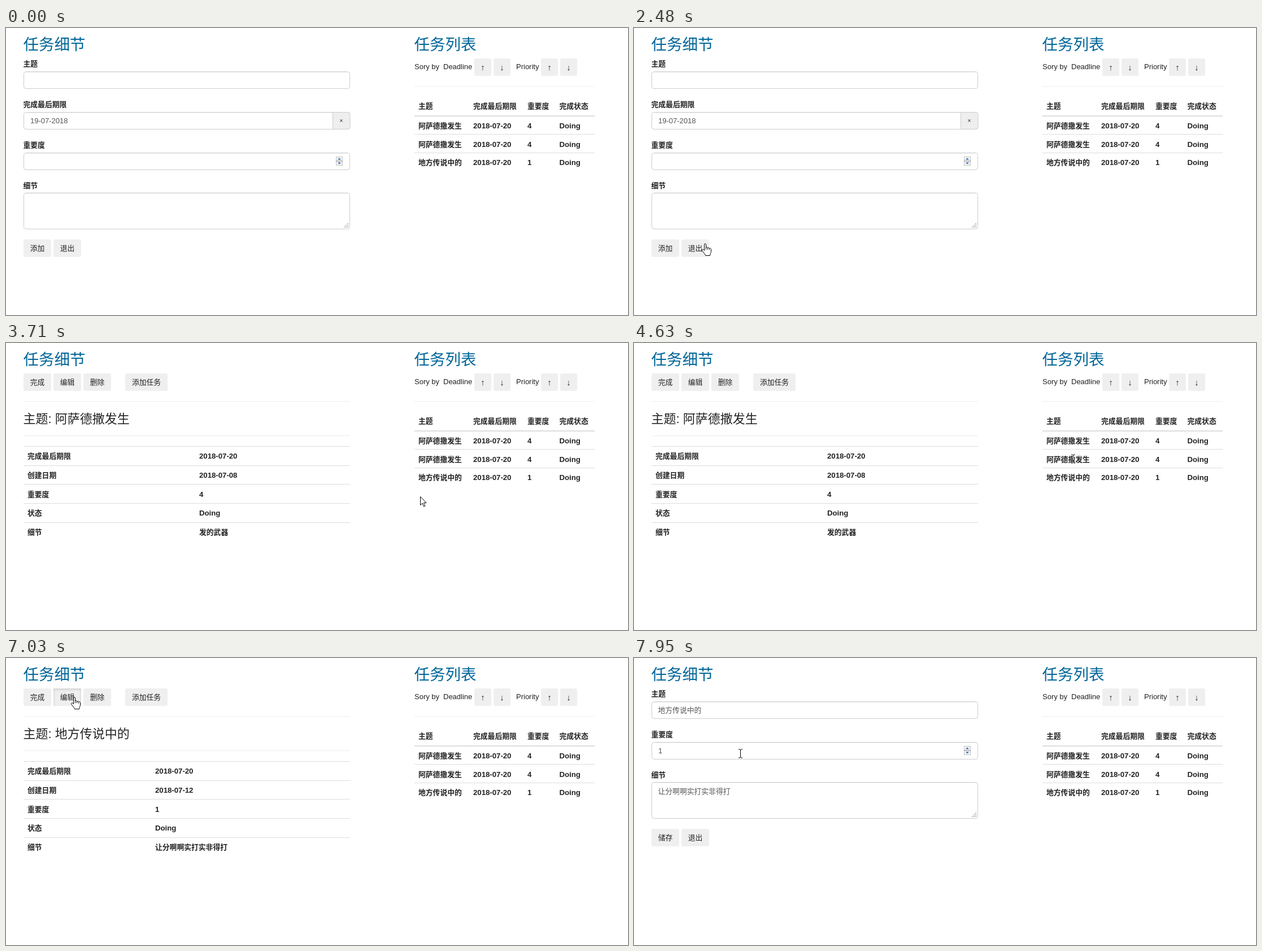
Animation, 1101 px wide and 509 px high, one loop 8000 ms. Source, as an HTML page:

```html
<!DOCTYPE html>
<html lang="zh-CN">
<head>
<meta charset="utf-8">
<title>任务</title>
<style>
  html, body { margin: 0; width: 100%; height: 100%; overflow: hidden; background: #fff; }
  svg { display: block; }
  #stage { width: 100vw; height: 100vh; }
  text { font: 12.8px "Liberation Sans", "Noto Sans CJK SC", "Noto Sans CJK", sans-serif; fill: #222; white-space: pre; }
  .title { font-size: 27.5px; fill: #006699; }
  .topic { font-size: 22px; }
  .latin { font-size: 13px; }
  .bold { font-weight: 700; }
  .value { font-weight: 700; font-size: 13.2px; }
  .field { fill: #555; }
  .sort { font-size: 15px; }
  .close { font-size: 11px; fill: #333; }
  .mid { text-anchor: middle; }
  .box { fill: #fff; stroke: #ccc; }
  .btn { fill: #efefef; }
  .beam { mix-blend-mode: difference; fill: none; stroke: #fff; }
  .solid { fill: #fff; stroke: #000; stroke-linejoin: round; }
</style>
</head>
<body>
<svg id="stage" viewBox="0 0 1101 509">
  <defs><filter id="soft" x="-20%" y="-40%" width="140%" height="180%"><feGaussianBlur stdDeviation="2"/></filter></defs>
  <g id="list"></g>
  <g id="form"></g>
  <g id="first"></g>
  <g id="third"></g>
  <g id="edit"></g>
  <g id="cursor">
    <path id="arrow" class="solid" d="M.5.5V15.6L4 12.2 6.6 18 8.9 17 6.4 11.4H11Z"/>
    <path id="hand" class="solid" transform="translate(-6 0)" d="M4.5 2C4.5 .1 7.5 .1 7.5 2V7C8.5 6.2 10.3 6.6 10.5 7.8 11.5 7.2 13.2 7.6 13.4 8.8 14.8 8.2 16.5 8.8 16.5 10.5V14.5C16.5 16.5 14.6 18 14.6 21.5H6.5C6.3 18.5 1.5 15.5 .6 12.5 .2 10.8 2.2 10 3.2 11.2L4.5 12.6ZM4.5 12.6V2M7.5 7V11M10.5 8V11M13.4 9V11.5"/>
  </g>
  <path id="beam" class="beam" d="M-3.5-7.5H-1L0-6.5 1-7.5H3.5M0-6.5V6.5M-3.5 7.5H-1L0 6.5 1 7.5H3.5"/>
</svg>
<script>
const $ = id => document.getElementById(id);

// Text is placed by the vertical centre of its line.
const SIZE = { title: 27.5, topic: 22 };
const text = (x, mid, str, cls = '') =>
  `<text x="${x}" y="${mid + (SIZE[cls] || 12.6) * 0.38}" class="${cls}">${str}</text>`;
const rule = (x1, x2, y, color = '#ddd', h = 1) =>
  `<rect x="${x1}" y="${y}" width="${x2 - x1}" height="${h}" fill="${color}"/>`;

function button(x, y, label, w = 49, pressedId) {
  const shade = pressedId
    ? `<svg id="${pressedId}" x="${x}" y="${y}" width="${w}" height="31">
        <rect x="-2" y="-.5" width="${w + 4}" height="36" rx="3" fill="none" stroke="#000" stroke-opacity=".18" stroke-width="4" filter="url(#soft)"/></svg>`
    : '';
  return `<rect class="btn" x="${x}" y="${y}" width="${w}" height="31" rx="3"/>` + shade +
    text(x + w / 2, y + 15.5, label, 'mid');
}

const box = (y, h) =>
  `<rect class="box" x="31.5" y="${y + .5}" width="577" height="${h}" rx="4"/>` + rule(34, 606, y + 1, '#f1f1f1');

const spinner = mid =>
  `<rect x="584.5" y="${mid - 7.5}" width="11" height="15" fill="#f3f3f3" stroke="#c4c4c4"/>` +
  rule(584, 596, mid - .5, '#888') +
  `<path fill="#3763bd" d="M587 ${mid - 2.5}h6l-3-3zM587 ${mid + 2.5}h6l-3 3z"/>`;

function area(y) {
  let dots = '';
  for (let row = 0; row < 3; row++)
    for (let col = 0; col <= row; col++)
      dots += `<rect x="${604 - col * 3}" y="${y + 54 + row * 3}" width="2" height="2" fill="#bbb"/>`;
  return box(y, 64) + dots;
}

const labels = names => names.map((n, i) => text(30.5, 63 + i * 72, n, 'bold')).join('');

function listView() {
  const cols = [730, 827, 923, 979.5];
  const rows = [['阿萨德撒发生', '4'], ['阿萨德撒发生', '4'], ['地方传说中的', '1']];
  let out = text(722.5, 29, '任务列表', 'title') + text(723, 68.5, 'Sory by', 'latin') +
    text(774, 68.5, 'Deadline', 'latin') + text(903, 68.5, 'Priority', 'latin');
  [829, 863, 947, 981].forEach((x, i) => {
    out += `<rect class="btn" x="${x}" y="54" width="30" height="31" rx="3"/>` +
      text(x + 15, 70.5, '↑↓'[i % 2], 'sort mid');
  });
  out += rule(723, 1042, 103, '#eee') + rule(723, 1042, 155, '#ddd', 2) +
    rule(723, 1042, 188) + rule(723, 1042, 221);
  ['主题', '完成最后期限', '重要度', '完成状态'].forEach((h, i) => out += text(cols[i], 138.5, h, 'bold'));
  rows.forEach(([name, rank], r) => {
    const y = 173 + r * 32.8;
    out += text(cols[0], y, name, 'bold');
    ['2018-07-20', rank, 'Doing'].forEach((v, i) => out += text(cols[i + 1], y, v, 'value'));
  });
  return out;
}

function detailView(name, x, values, pressedId) {
  const heads = ['完成最后期限', '创建日期', '重要度', '状态', '细节'];
  let out = button(31, 54, '完成') + button(84, 54, '编辑', 49, pressedId) + button(137, 54, '删除') +
    button(211, 54, '添加任务', 75) + rule(31, 609, 103, '#eee') +
    text(30.5, 134, '主题: ' + name, 'topic') + rule(31, 609, 164, '#eee');
  heads.forEach((h, i) => {
    const y = 200.5 + i * 33.7;
    out += rule(31, 609, Math.floor(183.3 + i * 33.7)) + text(38, y, h, 'bold') +
      text(x, y, values[i], i < 4 ? 'value' : 'bold');
  });
  return out;
}

const head = text(30.5, 29, '任务细节', 'title');
$('list').innerHTML = head + listView();
$('form').innerHTML = labels(['主题', '完成最后期限', '重要度', '细节']) +
  box(77, 30) + box(149, 30) + box(221, 30) + area(292) +
  '<path d="M578.5 149.5H605a4 4 0 0 1 4 4V175.5a4 4 0 0 1-4 4H578.5Z" fill="#eee" stroke="#ccc"/>' +
  text(593.5, 163, '×', 'close mid') + text(43, 164, '19-07-2018', 'field latin') + spinner(236) +
  button(31, 375, '添加') + button(84, 375, '退出', 49, 'pressQuit');
$('first').innerHTML = detailView('阿萨德撒发生', 342, ['2018-07-20', '2018-07-08', '4', 'Doing', '发的武器']);
$('third').innerHTML = detailView('地方传说中的', 264, ['2018-07-20', '2018-07-12', '1', 'Doing', '让分啊啊实打实非得打'], 'pressEdit');
$('edit').innerHTML = labels(['主题', '重要度', '细节']) +
  box(77, 30) + box(149, 30) + area(220) + spinner(164) +
  text(42.5, 92, '地方传说中的', 'field') + text(43, 164, '1', 'field latin') +
  text(42.5, 236, '让分啊啊实打实非得打', 'field') +
  button(31, 303, '储存') + button(84, 303, '退出');

// Pointer moves: start, end, number of steps, then points as [step, x, y, shape].
const A = 'arrow', H = 'hand', I = 'beam';
const moves = [
  [300, 770, 7, [[0, 1003, 433, A], [3, 868, 262, A], [5, 797, 184, I], [6, 784.5, 173.5, I]]],
  [1930, 2710, 11, [[0, 770, 178, I], [1, 715, 197, A], [3, 480, 272, A], [4, 350, 313, I], [5, 235, 350, I], [6, 158, 376, A], [7, 126, 382, H], [10, 123, 380, H]]],
  [3040, 3790, 11, [[0, 136, 379, A], [2, 235, 362, A], [5, 490, 318, A], [8, 706, 280, A], [9, 733, 272, A], [10, 759, 251, A]]],
  [3860, 4250, 6, [[0, 776, 238, I], [1, 801, 212, A], [2, 816, 200, A], [3, 803, 198.5, I], [5, 772.5, 200.5, I]]],
  [4400, 4630, 4, [[0, 773.5, 201.5, I], [3, 777.5, 205.5, I]]],
  [5240, 5480, 4, [[0, 779.5, 213.5, I], [1, 783.5, 222.5, A], [2, 783.5, 230.5, I], [3, 781.5, 235.5, I]]],
  [6170, 6930, 11, [[0, 770.5, 237.5, I], [1, 725, 239, A], [3, 550, 205, A], [6, 255, 115, A], [8, 146, 77, H], [9, 125, 68, H], [10, 121, 69, H]]],
  [7100, 7100, 1, [[0, 121, 70, A]]],
  [7250, 7950, 10, [[0, 122.5, 82.5, I], [2, 131, 116, A], [3, 138, 138, A], [4, 147, 158, I], [6, 167, 182, A], [7, 175, 181, A], [8, 183.5, 174.5, I], [9, 188.5, 169.5, I]]]
];
const SLACK = 8; // ms, since steps fall on whole hundredths of a second

function pointer(t) {
  const move = moves.filter(m => m[0] <= t).pop();
  if (!move) return null;
  const [start, end, count, pts] = move;
  const step = count > 1 ? Math.min(count - 1, Math.floor((t - start + SLACK) / (end - start) * (count - 1))) : 0;
  const i = pts.findLastIndex(p => p[0] <= step);
  const a = pts[i], b = pts[i + 1] || a;
  const k = b === a ? 0 : (step - a[0]) / (b[0] - a[0]);
  return { x: a[1] + (b[1] - a[1]) * k, y: a[2] + (b[2] - a[2]) * k, shape: a[3] };
}

const show = (id, on) => $(id).style.display = on ? '' : 'none';

function draw(now) {
  const t = now % 8000;
  const view = t < 2790 ? 'form' : t < 5860 ? 'first' : t < 7100 ? 'third' : 'edit';
  ['form', 'first', 'third', 'edit'].forEach(id => show(id, id === view));
  show('pressQuit', t >= 2710);
  show('pressEdit', t >= 7030);
  const p = pointer(t);
  [A, H, I].forEach(id => show(id, p && p.shape === id));
  if (p) {
    const target = p.shape === I ? $('beam') : $('cursor');
    const snap = p.shape === I ? v => Math.floor(v) + .5 : Math.round;
    target.setAttribute('transform', `translate(${snap(p.x)} ${snap(p.y)})`);
  }
  requestAnimationFrame(() => draw(performance.now()));
}
draw(performance.now());
</script>
</body>
</html>
```
